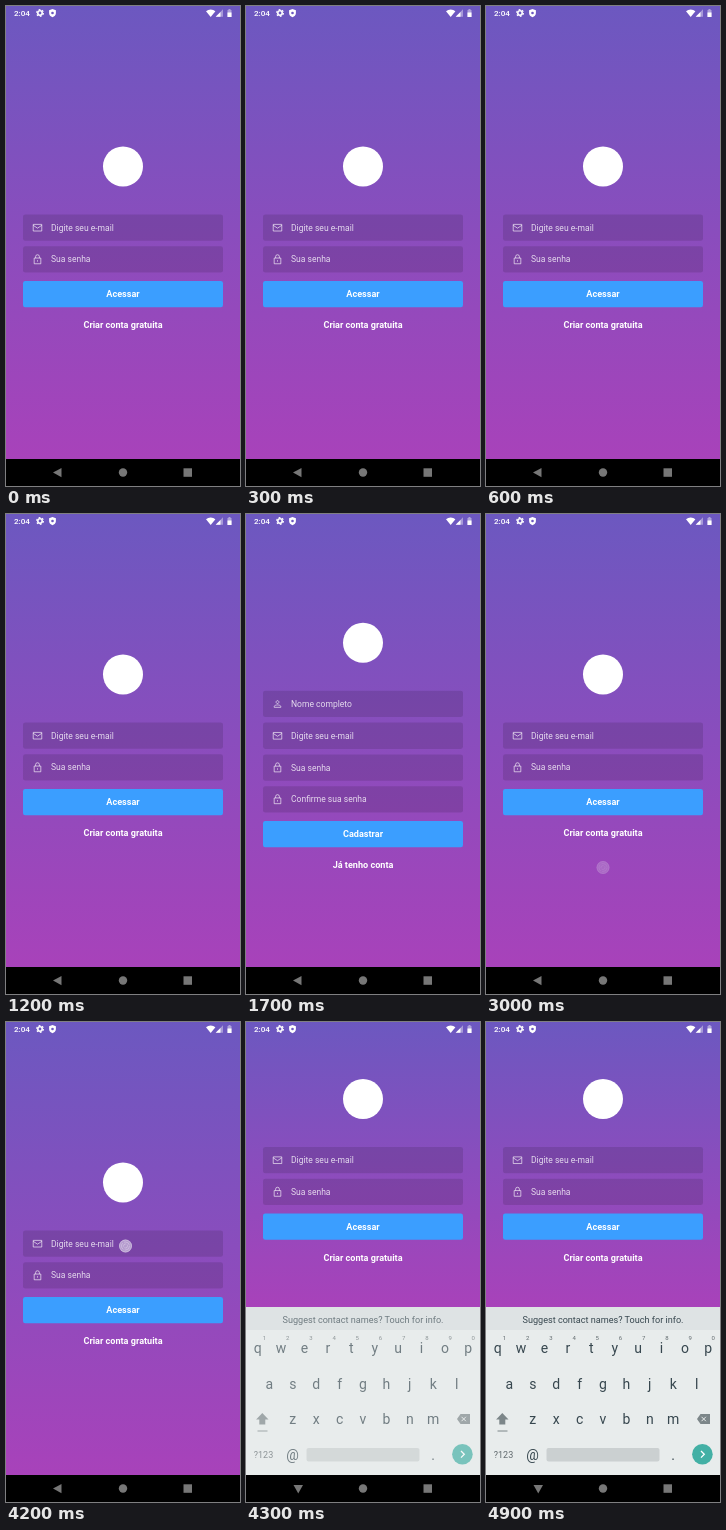
Write an HTML page that moves like this. It is 234 px wide and 480 px high and loops after 5 s.

```html
<!DOCTYPE html>
<html lang="pt">
<head>
<meta charset="utf-8">
<style>
html, body { margin: 0; width: 100%; height: 100%; overflow: hidden; background: #000; }
svg { display: block; width: 234px; height: 480px; font-family: Roboto, sans-serif; }
.mid { text-anchor: middle; }
.label { font-size: 8.54px; fill: #fff; fill-opacity: .8; }
.bold { font-size: 9.1px; font-weight: 700; fill: #fff; }
.icon { fill: none; stroke: #fff; stroke-opacity: .65; stroke-width: 2; }
.key { font-size: 14px; fill: #37474f; }
.hint { font-size: 6px; fill: #60696d; }
</style>
</head>
<body>
<svg viewBox="0 0 234 480">
  <defs>
    <linearGradient id="sky" x2="0" y2="1">
      <stop stop-color="#6c58c0"/><stop offset="1" stop-color="#a842ba"/>
    </linearGradient>
  </defs>
  <rect width="234" height="480"/>
  <rect id="bg" width="234" height="453" fill="url(#sky)"/>

  <g id="status" fill="#fff">
    <text x="8" y="10" font-size="8.1" font-weight="500">2:04</text>
    <circle cx="34" cy="7" r="2.2" fill="none" stroke="#fff" stroke-width="1.6"/>
    <circle cx="34" cy="7" r="3.4" fill="none" stroke="#fff" stroke-width="1.1" stroke-dasharray="1.8 1.76"/>
    <path d="M46.5 3l3.4 1.3v2.6c0 2-1.5 3.6-3.4 4.3-1.9-.7-3.4-2.3-3.4-4.3V4.300z"/>
    <circle cx="46.500" cy="7" r="1.300" fill="#6c58c0"/>
    <path d="M200 5.200a7 7 0 0 1 9.400 0L204.700 11z"/>
    <path d="M217 3.300v7.500h-7.300z" fill-opacity=".4"/>
    <path d="M214.500 5.900v4.900h-4.800z"/>
    <path d="M222.500 3h2v1h1v7h-4V4h1z" fill-opacity=".45"/>
    <path d="M221.500 6.500h4V11h-4z"/>
  </g>

  <g id="login"></g>
  <g id="signup"></g>

  <g id="board">
    <rect y="285" width="234" height="168" fill="#e8ecec"/>
    <rect y="285" width="234" height="23" fill="#dee3e4"/>
    <g id="keys"></g>
  </g>

  <g fill="#777">
    <path id="back" d="M55.500 462v9.200l-8.500-4.600z"/>
    <path id="hide" d="M47.500 463h9.500l-4.750 8.500z"/>
    <circle cx="117" cy="466.500" r="4.200"/>
    <rect x="177.500" y="462.300" width="8.500" height="8.500"/>
  </g>

  <g id="touch">
    <circle r="6.500" fill="#d5cce4" fill-opacity=".65"/>
    <g fill="none" stroke="#fff" stroke-opacity=".4" stroke-width=".7">
      <circle r="6"/><circle r="4" stroke-dasharray="7 1.400"/><circle r="2" stroke-dasharray="4 1"/>
    </g>
  </g>
</svg>
<script>
const $ = id => document.getElementById(id);
const icons = {
  mail: 'M3 5h18v14H3zM3 7l9 6 9-6',
  lock: 'M5 9h14v12H5zM8 9V6a4 4 0 0 1 8 0v3M12 13.500v3',
  person: 'M12 5a3 3 0 1 0 .01 0zM5 19v-1.500c0-2.500 4-3.500 7-3.500s7 1 7 3.500V19z'
};
const text = (x, y, cls, s) => `<text x="${x}" y="${y}" class="${cls}">${s}</text>`;

const field = (y, icon, label) =>
  `<rect x="17" y="${y}" width="200" height="26.300" rx="2.300" fill-opacity=".12"/>
   <path class="icon" transform="translate(25.800 ${y + 7.500}) scale(.475)" d="${icons[icon]}"/>` +
  text(45, y + 16.100, 'label', label);

function form(top, fields, action, link) {
  const y = top + fields.length * 31.800;
  return `<circle cx="117" cy="${top - 48}" r="20" fill="#fff"/>` +
    fields.map(([icon, label], i) => field(top + i * 31.800, icon, label)).join('') +
    `<rect x="17" y="${y + 2.900}" width="200" height="26.300" rx="2.300" fill="#3b9eff"/>` +
    text(117, y + 19.300, 'bold mid', action) + text(117, y + 50, 'bold mid', link);
}

const mail = ['mail', 'Digite seu e-mail'], lock = ['lock', 'Sua senha'];
$('login').innerHTML = form(208.500, [mail, lock], 'Acessar', 'Criar conta gratuita');
$('signup').innerHTML = form(176.800,
  [['person', 'Nome completo'], mail, lock, ['lock', 'Confirme sua senha']],
  'Cadastrar', 'Já tenho conta');

const row = (letters, x, y) =>
  [...letters].map((c, i) => text(x + i * 23.400, y, 'key mid', c)).join('');
$('keys').innerHTML =
  `<text x="117" y="300.500" class="mid" font-size="9.100" fill="#37474f">Suggest contact names? Touch for info.</text>` +
  row('qwertyuiop', 11.700, 330.500) + row('asdfghjkl', 23.400, 366.500) + row('zxcvbnm', 46.800, 402) +
  [...'1234567890'].map((c, i) => text(18.500 + i * 23.200, 318, 'hint mid', c)).join('') +
  text(46.500, 437.500, 'key mid', '@') + text(187, 437.500, 'key mid', '.') +
  `<text x="17.500" y="436" class="mid" font-size="9" fill="#60696d">?123</text>
   <rect x="60.500" y="426" width="113" height="13.500" rx="2" fill="#cbd0d1"/>
   <path d="M16.300 391l6.200 6.500h-3.200v5h-6v-5h-3.200z" fill="#7c8689"/>
   <path d="M11.500 409h10" stroke="#7c8689"/>
   <path d="M211 397l3.500-5h9.500v10h-9.500z" fill="#7c8689"/>
   <path d="M215.500 394.800l4.400 4.400m0-4.400l-4.400 4.400" stroke="#e8ecec"/>
   <circle cx="216.400" cy="432.300" r="10.300" fill="#43b0a5"/>
   <path d="M215 429l3.300 3.300-3.300 3.300" fill="none" stroke="#fff" stroke-width="1.300"/>`;

// Each tap: position, press time, release time and fade length
const taps = [[117, 320, 1300, 1400, 300], [117, 353.500, 2800, 2850, 250], [119.500, 224, 4000, 4200, 100]];
const clamp = v => Math.max(0, Math.min(1, v));
const show = (id, on) => $(id).setAttribute('display', on ? 'inline' : 'none');

function draw(now) {
  const t = Math.floor(now % 5000 / 100) * 100;
  const signup = t >= 1500 && t < 2900, typing = t >= 4300;
  show('login', !signup);
  show('signup', signup);
  show('board', typing);
  show('hide', typing);
  show('back', !typing);
  $('bg').setAttribute('height', typing ? 285 : 453);
  $('login').setAttribute('transform', `translate(0 ${typing ? -83.500 : 0})`);
  $('keys').setAttribute('opacity', clamp((t - 4100) / 300));

  const tap = taps.find(([, , down, up, fade]) => t >= down && t < up + fade);
  show('touch', tap);
  if (tap) {
    const [x, y, , up, fade] = tap;
    $('touch').setAttribute('transform', `translate(${x} ${y})`);
    $('touch').setAttribute('opacity', clamp(1 - (t - up) / fade));
  }
  requestAnimationFrame(draw);
}
const start = performance.now();
const tick = () => draw(performance.now() - start);
draw = (step => () => step(performance.now() - start))(draw);
tick();
</script>
</body>
</html>
```
